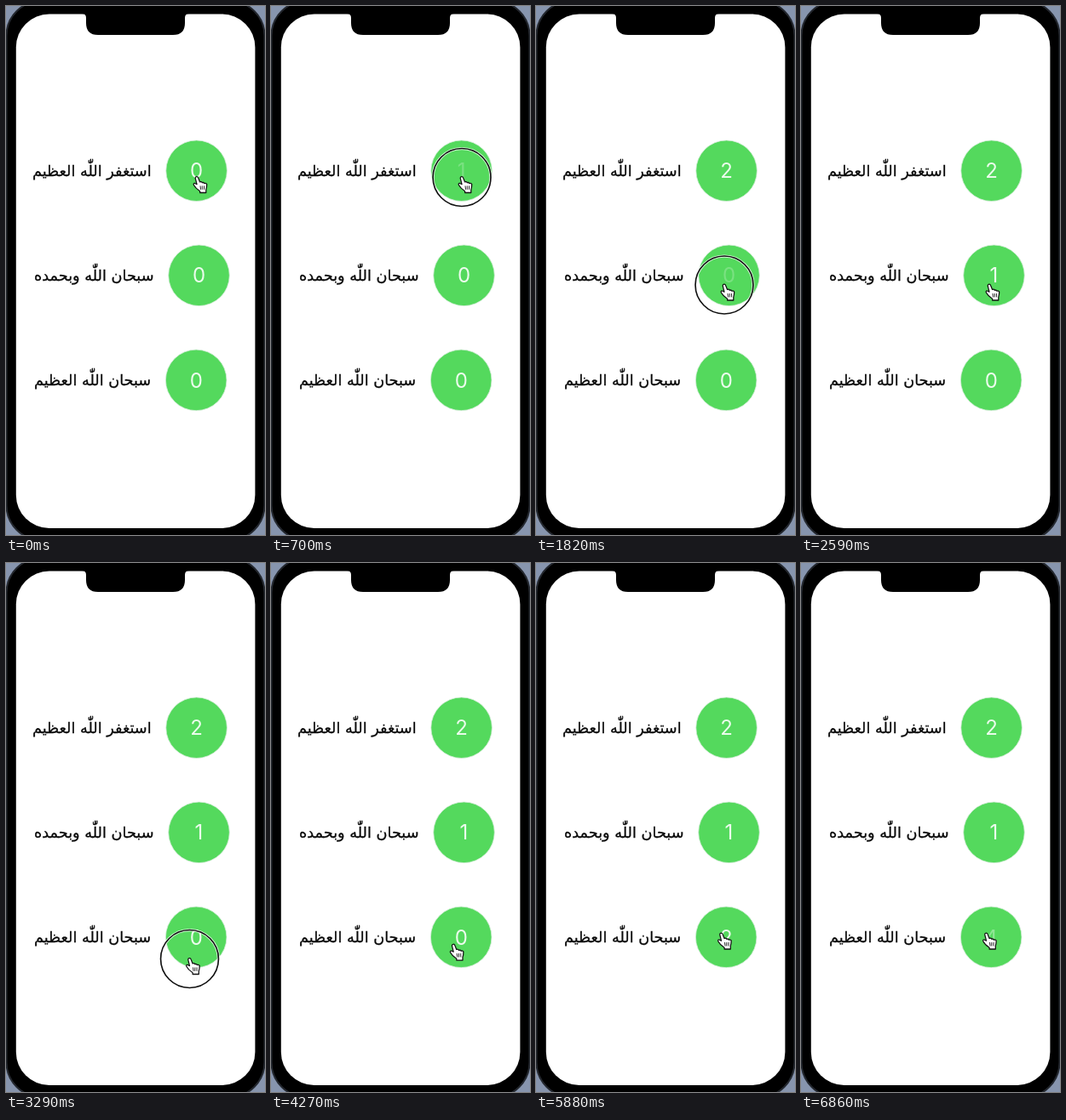
Animation, 304 px wide and 622 px high, one loop 6930 ms. Source, as an HTML page:

```html
<!DOCTYPE html>
<html lang="ar">
<head>
<meta charset="utf-8">
<title>Counter</title>
<style>
  html, body { margin: 0; width: 100%; height: 100%; overflow: hidden; background: #8795ae; }
  svg { display: block; width: 304px; height: 622px; }
  .label { font: 17.7px "DejaVu Sans", sans-serif; direction: rtl; fill: #0a0a0a; stroke: #0a0a0a; stroke-width: .3px; }
  .count { font: 400 24px Inter, Roboto, sans-serif; text-anchor: middle; fill: #ebfbec; }
  .dot { fill: #54d95d; stroke: #d5ecd8; stroke-width: .8px; }
</style>
</head>
<body>
<svg viewBox="0 0 304 622">
  <rect x=".5" y="-6" width="303" height="634" rx="41" stroke="#24282f" stroke-width="2"/>
  <rect x="11.8" y="9.5" width="280.6" height="604.5" rx="39" fill="#fff"/>
  <path d="M89 9Q94 9 94 14V20Q94 34 108 34H196Q210 34 210 20V14Q210 9 215 9Z"/>
  <g id="rows"></g>
  <g id="ring" fill="none">
    <circle r="35" stroke="#fff" stroke-width="3.4" stroke-opacity=".75"/>
    <circle r="35" stroke="#111" stroke-width="1.7"/>
  </g>
  <g id="hand" stroke="#111" stroke-linejoin="round" stroke-linecap="round">
    <path fill="#fff" stroke-width="1.4" d="M-2 1C-2-1 1-2 2 1L4 6Q6 5 7 7Q9 6 10 8Q12 7 13 9Q13 13 12 16V20H4V18Q-2 14-4 10C-5 8-3 7-2 8L0 9Z"/>
    <path fill="none" stroke-width="1" d="M4.500 11.500l.5 4M7 11.500v4M9.500 11.500v4"/>
  </g>
</svg>
<script>
const LOOP = 6930, STEP = 70, HOLD = 210, FADE = 280;
const $ = id => document.getElementById(id);
const clamp = v => Math.min(1, Math.max(0, v));
const ease = k => k * k * (3 - 2 * k);

const rowY = i => 193.7 + 123.1 * i;
const rows = [
  { text: 'استغفر اللّٰه العظيم', x: 223.6 },
  { text: 'سبحان اللّٰه وبحمده', x: 226.5 },
  { text: 'سبحان اللّٰه العظيم', x: 223.2 }
];

// Where the pointer rests, when, and when it taps there
const stops = [
  { x: 224, y: 201.5, from: 0, to: 1140, taps: [210, 700] },
  { x: 221, y: 328, from: 1400, to: 2590, taps: [1820] },
  { x: 215.5, y: 465.5, from: 3010, to: 3780, taps: [3290] },
  { x: 210, y: 465.5, from: 3990, to: 4060, taps: [] },
  { x: 217.5, y: 436, from: 4450, to: LOOP, taps: [4690, 5250, 5950, 6580] }
];
const taps = stops.flatMap(s => s.taps.map(press => ({ press, y: s.y })));

$('rows').innerHTML = rows.map(({ text, x }, i) => `
  <text class="label" x="${x - 53}" y="${rowY(i) + 6}">${text}</text>
  <circle class="dot" cx="${x}" cy="${rowY(i)}" r="35.8"/>
  <text class="count" x="${x}" y="${rowY(i) + 8.6}">0</text>`).join('');
const counts = document.querySelectorAll('.count');

function pointer(t) {
  const i = stops.findIndex(s => t < s.to);
  const b = stops[i], a = stops[i - 1] || b;
  const k = t >= b.from ? 1 : ease((t - a.to) / (b.from - a.to));
  return [a.x + (b.x - a.x) * k, a.y + (b.y - a.y) * k];
}

// Only taps close to the digit count; the digit dims while pressed
function drawCount(el, i, t) {
  const hits = taps.filter(p => t >= p.press && Math.abs(p.y - rowY(i)) < 16);
  const last = hits.length ? t - hits[hits.length - 1].press : Infinity;
  const held = last < HOLD;
  el.textContent = hits.length - held;
  el.setAttribute('opacity', held ? .25 : .2 + .8 * clamp((last - HOLD) / FADE));
}

function draw(now) {
  const t = Math.floor((now % LOOP) / STEP) * STEP;
  const move = `translate(${pointer(t)})`;
  const tap = taps.find(p => t >= p.press && t < p.press + HOLD + STEP);
  const age = tap ? t - tap.press : 0;

  counts.forEach((el, i) => drawCount(el, i, t));
  $('ring').setAttribute('opacity', !tap ? 0 : age < HOLD ? 1 : .5);
  $('ring').setAttribute('transform', `${move} scale(${age < STEP ? .97 : 1})`);
  $('hand').setAttribute('transform', `${move} scale(.9)`);
}

const start = performance.now();
function tick() {
  draw(performance.now() - start);
  requestAnimationFrame(tick);
}
tick();
</script>
</body>
</html>
```
